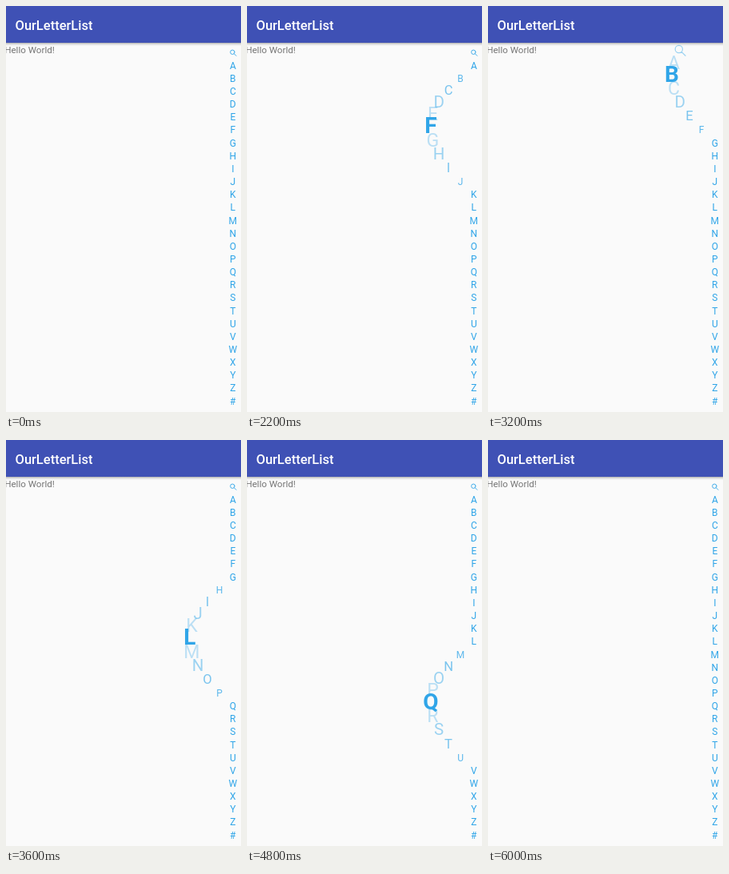
Recreate the animation shown at these times as an HTML page with a canvas. Size 294 by 508 pixels, loop 7400 ms.

```html
<!DOCTYPE html>
<html lang="en">
<head>
<meta charset="utf-8">
<title>Wave index bar</title>
<style>
  html, body { margin: 0; width: 100%; height: 100%; overflow: hidden; background: #fafafa; }
  canvas { display: block; width: 294px; height: 508px; }
</style>
</head>
<body>
<canvas id="stage"></canvas>
<script>
const WIDTH = 294, HEIGHT = 508, LOOP = 7400;
const BLUE = '#30a5e8';
const LETTERS = 'ABCDEFGHIJKLMNOPQRSTUVWXYZ#';
const REST_X = 283.8, FIRST_BASELINE = 62.6, ROW = 16.148;
const REACH = 5, MAX_OFFSET = 54, FONT_SIZE = 12;

// Each drag: start time, then the touched row at every 100 ms step.
const DRAGS = [
  [1500, [0, 1, 2]],
  [1900, [3, 4]],
  [2200, [6, 7]],
  [2500, [5, 3, 1, 0]],
  [3200, [2, 4, 6, 9, 12, 15, 18, 20]],
  [4000, [21, 22, 24]],
  [4600, [22, 20, 17, 14, 11, 8, 5, 2]],
  [5400, [0]],
  [6000, [null]]
];

const canvas = document.getElementById('stage');
const ctx = canvas.getContext('2d');
const ratio = window.devicePixelRatio || 1;
canvas.width = WIDTH * ratio;
canvas.height = HEIGHT * ratio;
ctx.scale(ratio, ratio);

function touchedRow(time) {
  let row = null;
  for (const [start, rows] of DRAGS) {
    if (time < start) break;
    row = rows[Math.min(rows.length - 1, Math.floor((time - start) / 100))];
  }
  return row;
}

const quarterWave = (distance, reach) =>
  distance < reach ? Math.cos(distance / reach * Math.PI / 2) : 0;

function rowStyle(index, selected) {
  const distance = selected === null ? REACH : Math.abs(index - selected);
  return {
    active: distance === 0,
    x: REST_X - MAX_OFFSET * quarterWave(distance, REACH),
    scale: distance === 0 ? 2.33 : 1 + quarterWave(distance, REACH - 1),
    alpha: distance === 0 || distance >= REACH ? 1 : 0.15 + 0.16 * distance
  };
}

function text(string, x, y, size, weight, color, align = 'left') {
  ctx.font = `${weight} ${size}px Roboto, sans-serif`;
  ctx.textAlign = align;
  ctx.fillStyle = color;
  ctx.fillText(string, x, y);
}

function magnifier(x, bottom, size, lineWidth) {
  const left = x - size / 2, top = bottom - size;
  const radius = size * 0.33, center = radius + lineWidth / 2;
  const edge = center + radius * 0.72, tip = size - lineWidth / 2;
  ctx.strokeStyle = BLUE;
  ctx.lineWidth = lineWidth;
  ctx.lineCap = 'round';
  ctx.beginPath();
  ctx.arc(left + center, top + center, radius, 0, Math.PI * 2);
  ctx.moveTo(left + edge, top + edge);
  ctx.lineTo(left + tip, top + tip);
  ctx.stroke();
}

function drawIndex(selected) {
  for (let i = 0; i <= LETTERS.length; i++) {
    const { active, x, scale, alpha } = rowStyle(i, selected);
    const baseline = FIRST_BASELINE + i * ROW;
    ctx.globalAlpha = alpha;
    if (i === 0) {
      magnifier(x + 0.5 + (active ? 3.5 : 0), baseline + (active ? 1.4 : 0.2),
        8.2 * scale, active ? 2.7 : 0.9 * Math.sqrt(scale));
    } else {
      text(LETTERS[i - 1], x, baseline, FONT_SIZE * scale, active ? 700 : 400, BLUE, 'center');
    }
  }
  ctx.globalAlpha = 1;
}

function drawHeader() {
  const shadow = ctx.createLinearGradient(0, 46, 0, 50);
  shadow.addColorStop(0, 'rgba(0,0,0,.32)');
  shadow.addColorStop(0.4, 'rgba(0,0,0,.12)');
  shadow.addColorStop(1, 'rgba(0,0,0,0)');
  ctx.fillStyle = shadow;
  ctx.fillRect(0, 46, WIDTH, 4);
  ctx.fillStyle = '#3f51b5';
  ctx.fillRect(0, 0, WIDTH, 46);
  text('OurLetterList', 11.5, 29.6, 16.5, 500, '#fff');
}

function draw(now) {
  ctx.fillStyle = '#fafafa';
  ctx.fillRect(0, 0, WIDTH, HEIGHT);
  text('Hello World!', -1.8, 58.6, 11.6, 400, '#757575');
  drawIndex(touchedRow(now % LOOP));
  drawHeader();
  requestAnimationFrame(draw);
}

draw(performance.now());
</script>
</body>
</html>
```
